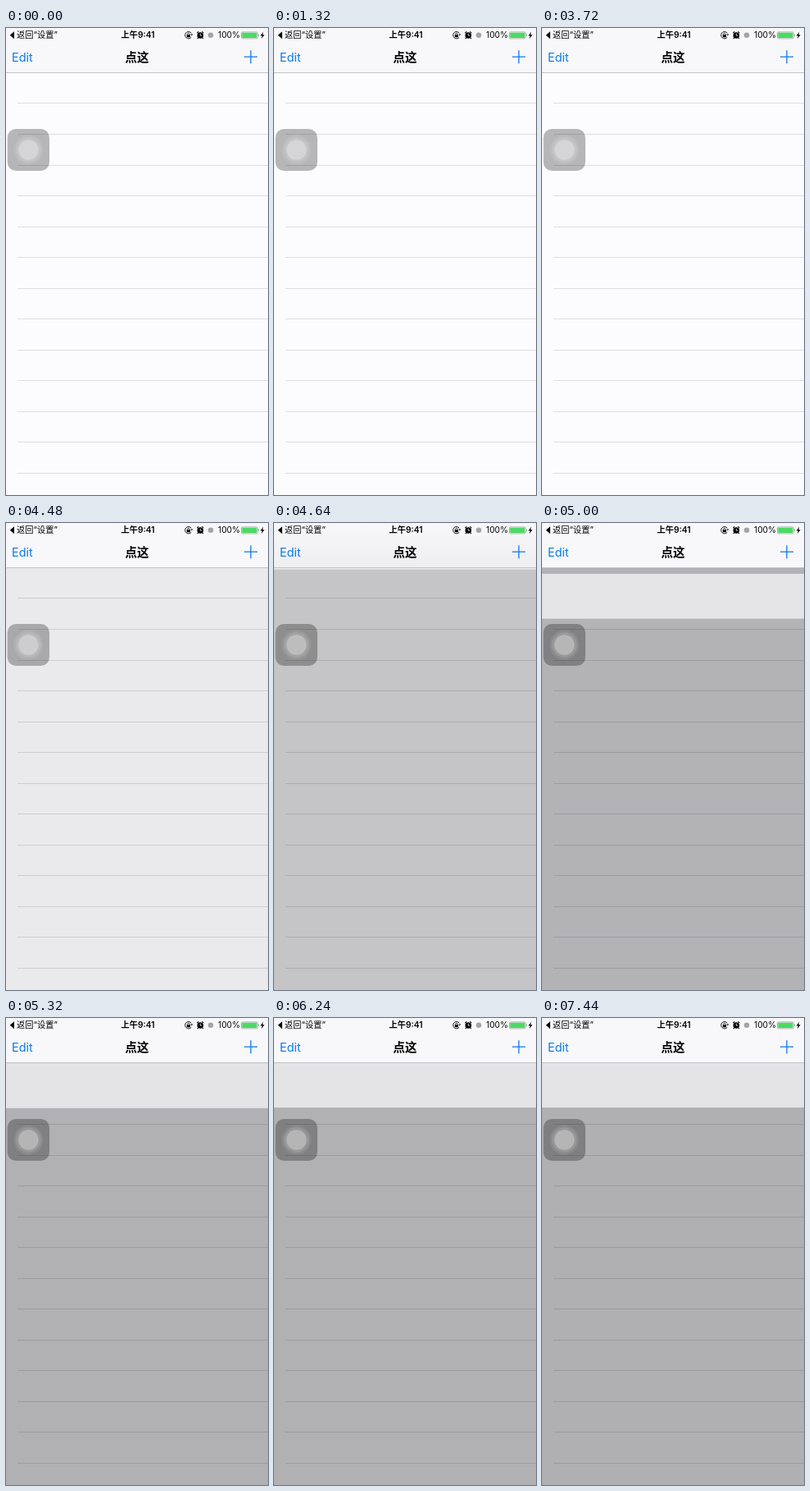
Animation of 320x569 px, one loop 8 s. Source, as an HTML page:

```html
<!DOCTYPE html>
<html lang="zh-CN">
<head>
<meta charset="utf-8">
<title>Dropdown panel</title>
<style>
  html, body { margin: 0; width: 100%; height: 100%; overflow: hidden; background: #fcfbfe; }
  svg { display: block; width: 100%; height: 100%; }
  text { font-family: Inter, "Noto Sans CJK SC", "Noto Sans CJK", sans-serif; }
  .status { font-size: 10.24px; }
  .bar { font-size: 14.5px; }
  .blue { fill: #097be9; }
  .crisp { shape-rendering: crispEdges; }
</style>
</head>
<body>
<svg viewBox="0 0 320 569">
  <defs>
    <linearGradient id="tint" x2="0" y2="1">
      <stop offset="0" stop-color="#d8d7da" stop-opacity="0"/>
      <stop offset="1" stop-color="#d8d7da" stop-opacity=".35"/>
    </linearGradient>
  </defs>

  <rect width="320" height="569" fill="#fcfbfe"/>
  <g id="rows" class="crisp" fill="#dedde0"></g>
  <rect id="dim" width="320" height="569" opacity="0"/>
  <rect id="panel" width="320" height="54.7" y="-55"/>

  <g id="touch">
    <rect x="1.7" y="123" width="51.3" height="51" rx="10.5" fill="#000" fill-opacity=".28"/>
    <g fill="#fff">
      <circle cx="27.4" cy="148.5" r="18" fill-opacity=".08"/>
      <circle cx="27.4" cy="148.5" r="15.3" fill-opacity=".12"/>
      <circle cx="27.4" cy="148.5" r="12.2" fill-opacity=".29"/>
    </g>
  </g>

  <g id="navbar">
    <rect width="320" height="54" fill="#f8f7f9"/>
    <rect id="navTint" width="320" height="54" fill="url(#tint)" opacity="0"/>
    <rect class="crisp" y="54" width="320" height="1" fill="#c3c2c6"/>
    <text class="bar blue" x="7" y="41">Edit</text>
    <text class="bar" x="160" y="41" text-anchor="middle" font-weight="700">点这</text>
    <path d="M291 35.2h16M299 27.2v16" stroke="#097be9" stroke-width="1.3"/>
  </g>

  <g id="statusbar">
    <path d="M10 4.2v9L4.800 8.700z"/>
    <text class="status" x="13" y="12.2">返回“设置”</text>
    <text class="status" x="161" y="12.2" text-anchor="middle" font-weight="600">上午9:41</text>

    <g fill="none" stroke="#000">
      <path d="M226.300 6.200A4.200 4.200 0 1 0 226.300 11.200" stroke-width=".9"/>
      <path d="M221.600 8.500v-1a1.300 1.300 0 0 1 2.600 0v1" stroke-width=".7"/>
    </g>
    <path d="M220.800 8.200h4.200v3h-4.200zM225.400 7.400h2.800l-1.400 2z"/>

    <circle cx="237.300" cy="9" r="3.800"/>
    <path d="M233.300 6.200l2-1.800M241.300 6.200l-2-1.800M234.700 12l-1 1.200M239.900 12l1 1.200" stroke="#000" stroke-width="1.100"/>
    <path d="M237.300 6.700v2.500h2" fill="none" stroke="#f8f7f9" stroke-width=".8"/>

    <circle cx="250" cy="8.800" r="3.300" fill="#a5a4a7"/>
    <text class="status" x="259" y="12.2">100%</text>

    <rect x="287.400" y="4.900" width="19.800" height="8" rx="1.500" fill="#f8f7f9" stroke="#58705c" stroke-width=".5"/>
    <rect x="288.200" y="5.700" width="18.200" height="6.400" rx=".8" fill="#4cd964"/>
    <path d="M308 7.300q1.500 1.600 0 3.200z" fill="#58705c"/>
    <path d="M314.300 4.600l-3.600 4.800h2.200l-1 3.800 3.700-5h-2.300z"/>
  </g>
</svg>
<script>
  const LOOP = 8000, STEP = 40;
  const DIM_START = 4440, DROP_START = 4452;
  const HIDDEN_Y = -55, REST_Y = 54.4;
  const el = id => document.getElementById(id);
  const set = (id, attrs) => {
    for (const key in attrs) el(id).setAttribute(key, attrs[key]);
  };

  for (let i = 0; i < 13; i++) {
    const row = document.createElementNS(el('rows').namespaceURI, 'rect');
    el('rows').append(row);
    const y = Math.floor(91.95 + i * 37.547);
    Object.entries({ x: 14, y, width: 306, height: 1 })
      .forEach(([key, value]) => row.setAttribute(key, value));
  }

  // Remaining distance of an underdamped spring, 1 at rest start, 0 when settled.
  function spring(seconds) {
    const decay = 4.95, freq = 5.8;
    const phase = freq * seconds;
    return Math.exp(-decay * seconds) * (Math.cos(phase) + decay / freq * Math.sin(phase));
  }

  function draw(ms) {
    const fade = 1 - Math.exp(-6.5 * Math.max(0, ms - DIM_START) / 1000);
    const left = spring(Math.max(0, ms - DROP_START) / 1000);
    const passing = Math.min(1, Math.max(0, (ms - 4480) / 480));
    const shade = Math.round(243 - 15 * fade ** 3);

    set('dim', { opacity: 0.3 * fade });
    set('panel', {
      y: REST_Y + (HIDDEN_Y - REST_Y) * left,
      fill: `rgb(${shade},${shade - 1},${shade + 2})`
    });
    set('navTint', { opacity: Math.sin(Math.PI * passing) });
  }

  const start = performance.now();
  function tick() {
    const ms = (performance.now() - start) % LOOP;
    draw(Math.floor(ms / STEP) * STEP);
    requestAnimationFrame(tick);
  }
  tick();
</script>
</body>
</html>
```
